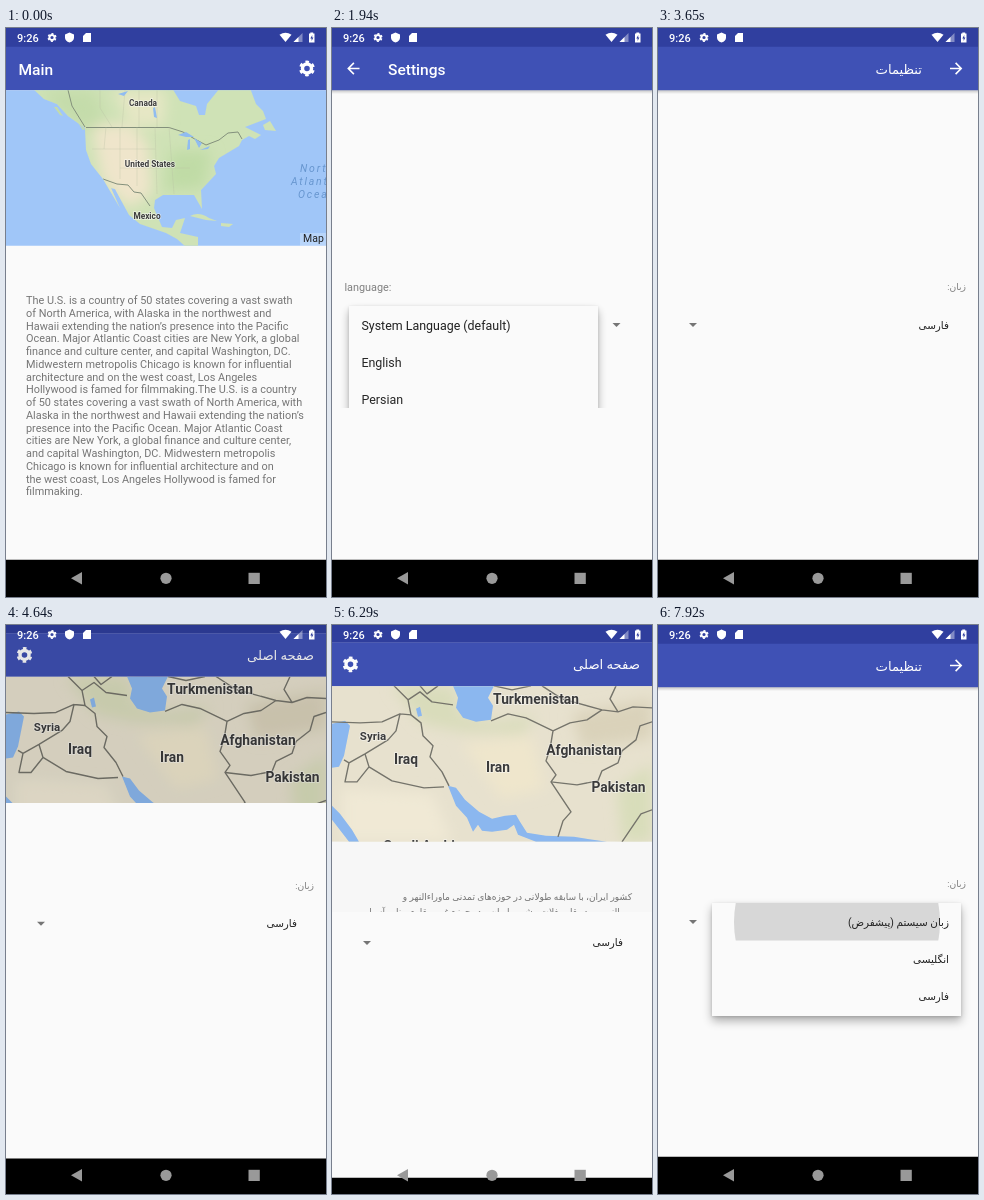
Animation, 320 px wide and 569 px high, one loop 8 s. Source, as an HTML page:

```html
<!DOCTYPE html>
<html lang="en">
<head>
<meta charset="utf-8">
<title>Language switch</title>
<style>
html, body { margin: 0; width: 100%; height: 100%; overflow: hidden; background: #000; }
body { font-family: Roboto, "DejaVu Sans", sans-serif; }
#stage { position: relative; width: 320px; height: 569px; overflow: hidden; background: #000; }
#stage svg, .screen, .popup, .copy { position: absolute; }
.screen { inset: 0; background: #fafafa; }
svg { left: 0; top: 0; display: block; }
.screen, .popup, .ripple, .swap { animation: 8s linear infinite both; }

.title { font-size: 15.56px; font-weight: 500; fill: #fff; }
.fa .title { font-size: 13.2px; font-weight: 400; }
.label { font-size: 10.89px; fill: #808080; }
.item { font-size: 12.45px; fill: #212121; }
.fa .item { font-size: 10.4px; }
.fa .label { font-size: 9.2px; }
.fa text:not(.place) { direction: rtl; }
.place { font-weight: 700; fill: #3c3c3c; text-anchor: middle; paint-order: stroke; stroke: #fff; stroke-opacity: .6; stroke-width: 1.5px; }
.sea { font-size: 10.5px; font-style: italic; letter-spacing: 1.8px; fill: #6796cf; }
.copy { margin: 0; white-space: pre; color: #757575; font-size: 10.89px; line-height: 12.76px; left: 20px; top: 267px; }
.fa .copy { direction: rtl; left: auto; right: 20px; top: 266px; font-size: 9.1px; line-height: 15.15px; }
.grain { position: absolute; inset: 218px 0 37px; opacity: .6;
  background: repeating-linear-gradient(#0000 0 2px, #00000008 2px 3px, #0000 3px 7px, #00000006 7px 8px), #f7f7f7;
  animation: grain 8s linear infinite; }

.popup { top: 278px; width: 249px; height: 112.5px; background: #fafafa; box-shadow: 0 5px 9px #0000004d, 0 1px 3px #00000026; }
.popup svg { overflow: hidden; }
.en .popup { left: 17px; animation-name: popupEn; }
.fa .popup { left: 54px; animation-name: popupFa; }
.ripple { fill: #000; fill-opacity: .14; }
.en .ripple { animation-name: rippleEn; }
.fa .ripple { animation-name: rippleFa; }
.before { animation-name: before; }
.after { animation-name: after; }

#mainEn { animation-name: mainEnShow, mainEnMove; }
#setEn { animation-name: setEnShow, setEnMove, setEnClip; }
#mainFa { animation-name: mainFaShow, mainFaMove; }
#setFa { animation-name: setFaShow, setFaMove, setFaClip; }

@keyframes grain { 0%, 1% { opacity: 0; } 8%, 100% { opacity: 1; } }

/* windows slide a little while a clip edge wipes over them */
@keyframes mainEnShow {
  0% { visibility: visible; animation-timing-function: step-end; }
  20.125%, 100% { visibility: hidden; }
}
@keyframes mainEnMove {
  0%, 14.8125% { transform: none; opacity: 1; animation-timing-function: cubic-bezier(.4,0,.2,1); }
  20.125%, 100% { transform: translateY(-2%); opacity: .9; }
}
@keyframes setEnShow {
  0% { visibility: hidden; animation-timing-function: step-end; }
  14.8125% { visibility: visible; animation-timing-function: step-end; }
  44.625%, 100% { visibility: hidden; }
}
@keyframes setEnMove {
  0%, 14.8125% { transform: translateY(4.1%); animation-timing-function: cubic-bezier(.4,0,.2,1); }
  20.125%, 100% { transform: none; }
}
@keyframes setEnClip {
  0%, 14.8125% { clip-path: inset(95.9% 0 0 0); animation-timing-function: cubic-bezier(.3,0,.8,.15); }
  15.698% { clip-path: inset(57.54% 0 0 0); animation-timing-function: cubic-bezier(.05,.7,.1,1); }
  20.125%, 100% { clip-path: inset(0 0 0 0); }
}
@keyframes mainFaShow {
  0% { visibility: hidden; animation-timing-function: step-end; }
  57.175%, 100% { visibility: visible; }
}
@keyframes mainFaMove {
  0%, 57.175% { transform: translateY(-2%); opacity: .9; animation-timing-function: cubic-bezier(.4,0,.2,1); }
  62.4875%, 77.6875% { transform: none; opacity: 1; animation-timing-function: cubic-bezier(.4,0,.2,1); }
  83%, 100% { transform: translateY(-2%); opacity: .9; }
}
@keyframes setFaShow {
  0% { visibility: hidden; animation-timing-function: step-end; }
  44.625% { visibility: visible; animation-timing-function: step-end; }
  62.4875% { visibility: hidden; animation-timing-function: step-end; }
  77.6875%, 100% { visibility: visible; }
}
@keyframes setFaMove {
  0%, 57.175% { transform: none; animation-timing-function: cubic-bezier(.4,0,.2,1); }
  62.4875%, 77.6875% { transform: translateY(4.1%); animation-timing-function: cubic-bezier(.4,0,.2,1); }
  83%, 100% { transform: none; }
}
@keyframes setFaClip {
  0%, 57.175% { clip-path: inset(0 0 0 0); animation-timing-function: cubic-bezier(.3,0,.8,.15); }
  58.06% { clip-path: inset(38.36% 0 0 0); animation-timing-function: cubic-bezier(.05,.7,.1,1); }
  62.4875%, 77.6875% { clip-path: inset(95.9% 0 0 0); animation-timing-function: cubic-bezier(.3,0,.8,.15); }
  78.5725% { clip-path: inset(57.54% 0 0 0); animation-timing-function: cubic-bezier(.05,.7,.1,1); }
  83%, 100% { clip-path: inset(0 0 0 0); }
}
@keyframes popupEn {
  0%, 22.75% { opacity: 0; clip-path: inset(0 0 75px 0); animation-timing-function: ease-out; }
  24.5% { opacity: 1; }
  26.25%, 41.625% { opacity: 1; clip-path: inset(-10px -30px -30px -30px); }
  43.5%, 100% { opacity: 0; clip-path: inset(-10px -30px -30px -30px); }
}
@keyframes popupFa {
  0%, 87.25% { opacity: 0; clip-path: inset(0 0 75px 0); animation-timing-function: ease-out; }
  89% { opacity: 1; }
  90.75%, 100% { opacity: 1; clip-path: inset(-10px -30px -30px -30px); }
}
@keyframes rippleEn {
  0% { r: 0px; animation-timing-function: step-end; }
  37.625% { r: 60px; }
  40%, 100% { r: 260px; }
}
@keyframes rippleFa {
  0% { r: 0px; animation-timing-function: step-end; }
  99%, 100% { r: 103px; }
}
@keyframes before { 0% { opacity: 1; animation-timing-function: step-end; } 41.625%, 100% { opacity: 0; } }
@keyframes after { 0% { opacity: 0; animation-timing-function: step-end; } 41.625%, 100% { opacity: 1; } }
</style>
</head>
<body>
<div id="stage">
<svg width="0" height="0">
  <defs>
    <g id="gear" fill="none" stroke="#fff">
      <circle r="5.5" stroke-width="4.2"/>
      <circle r="8.2" stroke-width="2.8" stroke-dasharray="4.294" transform="rotate(15)"/>
    </g>
    <path id="back" d="M6 0H-5M.4-5.6-5.2 0 .4 5.6" fill="none" stroke="#fff" stroke-width="1.6"/>
    <path id="caret" d="M-4-2H4L0 2Z" fill="#757575"/>
    <linearGradient id="shade" x2="0" y2="1"><stop stop-opacity=".2"/><stop offset="1" stop-opacity="0"/></linearGradient>
    <g id="bars">
      <path d="M0 0H320V19H0Z" fill="#303f9f"/>
      <path d="M0 18.7H320V62.3H0Z" fill="#3f51b5"/>
      <path d="M0 531.7H320V569H0Z"/>
    </g>
    <path id="drop" d="M0 62.3H320V66H0Z" fill="url(#shade)"/>
    <clipPath id="pane"><path d="M0 62.3H320V217.8H0Z"/></clipPath>
    <filter id="soft" x="-30%" y="-30%" width="160%" height="160%"><feGaussianBlur stdDeviation="7"/></filter>
    <path id="america" d="M26 60 38 71 51 76 62 88 79 100 80 122 85 136 97 151 114 180 105 160 109 161 123 187 134 196 160 205 171 211 180 219H192V209L174 205 179 190 170 192 166 200 156 199 148 180 149 172 157 167 188 167 196 181 195 162 210 146 208 138 213 130 233 118 236 112 243 108 249 111 255 107 239 99 260 91 257 83 250 76 244 60H214L201 76 199 87 193 87 190 78 174 73 166 60Z"/>
    <clipPath id="usLand"><use href="#america"/></clipPath>
  </defs>
</svg>

<div class="screen en" id="mainEn">
  <div class="grain"></div>
  <svg width="320" height="569">
    <use href="#bars"/>
    <g clip-path="url(#pane)">
      <path d="M0 62H320V218H0Z" fill="#a0c6f8"/>
      <use href="#america" fill="#cfe2b6"/>
      <g clip-path="url(#usLand)">
        <g filter="url(#soft)">
          <path d="M86 98 122 96 142 115 146 165 122 180 96 152Z" fill="#efe5cb"/>
          <path d="M106 62 160 62 158 98 126 98Z" fill="#e6e7c5"/>
          <path d="M35 62 88 62 100 92 80 104 50 80Z" fill="#c4dcaa"/>
          <path d="M165 123 205 123 198 160 158 162Z" fill="#c0dba6"/>
        </g>
        <path d="M80 99.5H163L177 104 187 110 200 117 213 112 222 105 232 104 236 111M97 151 111 156 122 157 128 164 135 165 144 178M62 62 66 78 79 99" fill="none" stroke="#83907c"/>
        <path d="M94 62V80L106 99M119 62 116 99M133 62V99M151 62V99M100 99 98 121M114 99V151M131 99V158M149 99 151 166M163 99 168 166M86 121H149M114 140H184" fill="none" stroke="#b6bda0" stroke-width=".5" stroke-opacity=".6"/>
        <path d="M172 107 180 104 188 109 180 109ZM182 112 184 111V121L181 122ZM188 110 196 115 193 120ZM194 122 204 118 202 121ZM147 80 149 79 151 90 148 89ZM112 66 122 63 118 68Z" fill="#90bcf0"/>
      </g>
      <path d="M184 188Q193 183 203 190L211 193 200 192ZM215 195 227 196 223 199 215 198ZM257 97 264 93 270 103 259 102Z" fill="#cfe2b6"/>
      <path d="M48 79 54 87 57 88 51 79ZM72 95 79 101 77 102Z" fill="#c4dcaa"/>
      <g style="font-size:8.3px">
        <text class="place" x="137" y="78">Canada</text>
        <text class="place" x="144" y="139">United States</text>
        <text class="place" x="141" y="191">Mexico</text>
      </g>
      <g class="sea">
        <text x="294" y="144">North</text><text x="285" y="157">Atlantic</text><text x="292" y="170">Ocean</text>
      </g>
      <path d="M294 205H320V218H294Z" fill="#fff" fill-opacity=".25"/>
      <text x="297" y="213.5" font-size="10.5" fill="#222">Map</text>
    </g>
    <text class="title" x="12.4" y="46.5">Main</text>
    <use href="#gear" transform="translate(301 40.5) scale(.82)"/>
  </svg>
  <p class="copy">The U.S. is a country of 50 states covering a vast swath
of North America, with Alaska in the northwest and
Hawaii extending the nation’s presence into the Pacific
Ocean. Major Atlantic Coast cities are New York, a global
finance and culture center, and capital Washington, DC.
Midwestern metropolis Chicago is known for influential
architecture and on the west coast, Los Angeles
Hollywood is famed for filmmaking.The U.S. is a country
of 50 states covering a vast swath of North America, with
Alaska in the northwest and Hawaii extending the nation’s
presence into the Pacific Ocean. Major Atlantic Coast
cities are New York, a global finance and culture center,
and capital Washington, DC. Midwestern metropolis
Chicago is known for influential architecture and on
the west coast, Los Angeles Hollywood is famed for
filmmaking.</p>
</div>

<div class="screen fa" id="mainFa">
  <svg width="320" height="569">
    <use href="#bars"/>
    <g clip-path="url(#pane)">
      <path d="M0 62H320V218H0Z" fill="#eae4d1"/>
      <g filter="url(#soft)">
        <path d="M60 62 122 62 128 90 160 98 205 92 190 110 130 108 90 100Z" fill="#dcdfbe"/>
        <path d="M130 120 200 112 212 165 170 175Z" fill="#f2e9cf"/>
        <path d="M240 90 320 75V115L250 125Z" fill="#ddd5bd"/>
        <path d="M285 165 320 140V218H290Z" fill="#dbe0bd"/>
        <path d="M10 165 100 170 120 218H10Z" fill="#f3ecd8"/>
      </g>
      <g fill="#8dbaf2">
        <path d="M121 62 126 74 124 84 131 94 144 98 159 96 161 82 156 74 162 62Z"/>
        <path d="M0 100 13 97 18 102 15 117 12 132 7 143 0 144Z"/>
        <path d="M116 162 124 164 133 176 147 188 160 195 173 192 184 191 188 198 195 209 214 212 242 213 275 218H204L186 211 182 201 175 206 160 208 150 207 146 201 141 208 135 194 124 182Z"/>
        <path d="M0 182 8 190 20 206 27 218H17L0 196ZM84 85 88 83 90 92 86 93Z"/>
      </g>
      <g fill="none" stroke="#77766d" stroke-width="1.4" stroke-linejoin="round">
        <path d="M0 98 28 99 50 98 68 90 64 107 56 116 33 130 17 139 12 136M33 130 37 143 60 157 92 164 112 163M17 139 13 158H25L37 143M62 62 76 76 79 91 68 90M76 76 88 68 100 78 121 81M88 62 95 70 106 62"/>
        <path d="M79 91 89 99 91 112 101 122 98 133 110 148 117 162M159 97 176 90 194 94 221 107 218 125 214 137 224 151 219 158 239 188 231 197 226 213"/>
        <path d="M221 107 238 99 255 96 270 86 286 88 301 83 320 84M219 158 245 161 266 157 270 147 286 139 290 127 304 116 308 102 320 98M162 62 180 66 199 62M210 62 230 75 270 86M284 62 278 75 286 88M290 218 309 190 320 186"/>
      </g>
      <g style="font-size:13.8px">
        <text class="place" x="204" y="80">Turkmenistan</text>
        <text class="place" x="252" y="131">Afghanistan</text>
        <text class="place" x="286.5" y="168">Pakistan</text>
        <text class="place" x="166" y="148">Iran</text>
        <text class="place" x="74" y="140">Iraq</text>
        <text class="place" x="91" y="227">Saudi Arabia</text>
        <text class="place" x="41" y="116.5" font-size="11.5">Syria</text>
      </g>
    </g>
    <text class="title" x="308" y="45.5">صفحه اصلی</text>
    <use href="#gear" transform="translate(18.5 40.5) scale(.82)"/>
  </svg>
  <p class="copy">کشور ایران، با سابقه طولانی در حوزه&zwnj;های تمدنی ماوراءالنهر و
بین&zwnj;النهرین، در قلب فلات مشهور ایران و در حوزه غربی قاره پهناور آسیا
در منطقه&zwnj;ای که اکنون به خاورمیانه شهرت دارد، واقع است. آثار باستانی
و تاریخی ایران به بیش از چهار هزار سال پیش بازمی&zwnj;گردد.ایران تا سال
1313 در مناسبات و روابط بین&zwnj;المللی با نام پرشیا در جهان شناخته
می&zwnj;شد با این حال پیش از آن نیز، بنابر اسناد تاریخی، شواهد، قراین،
فرهنگ شفاهی، کشفیات باستان&zwnj;شناسی و زبان&zwnj;شناسی می&zwnj;توان گفت 4 نام
برای کشور ایران به&zwnj;کار رفته است. قاره پهناور آسیا در منطقه&zwnj;ای که اکنون
به خاورمیانه شهرت دارد، واقع است. آثار باستانی و تاریخی ایران به
بیش از چهار هزار سال پیش بازمی&zwnj;گردد.ایران تا سال 1313 در مناسبات
و روابط بین&zwnj;المللی با نام پرشیا در جهان شناخته می&zwnj;شد با این حال پیش
از آن نیز، بنابر اسناد تاریخی، شواهد، قراین، فرهنگ شفاهی، کشفیات
باستان&zwnj;شناسی و زبان&zwnj;شناسی می&zwnj;توان گفت 4 نام برای کشور ایران به&zwnj;کار
رفته است</p>
</div>

<div class="screen en" id="setEn">
  <svg width="320" height="569">
    <use href="#bars"/><use href="#drop"/>
    <use href="#back" x="21.5" y="40.5"/>
    <text class="title" x="56" y="46.5">Settings</text>
    <text class="label" x="12.4" y="262.5">language:</text>
    <text class="item swap before" x="29" y="301.6">System Language (default)</text>
    <text class="item swap after" x="29" y="301.6">Persian</text>
    <use href="#caret" x="284.5" y="297"/>
  </svg>
  <div class="popup">
    <svg width="249" height="112.5">
      <svg y="75" width="249" height="37.5"><circle class="ripple" cx="124" cy="19"/></svg>
      <text class="item" x="12.4" y="23.6">System Language (default)</text>
      <text class="item" x="12.4" y="61">English</text>
      <text class="item" x="12.4" y="98.3">Persian</text>
    </svg>
  </div>
</div>

<div class="screen fa" id="setFa">
  <svg width="320" height="569">
    <use href="#bars"/><use href="#drop"/>
    <use href="#back" transform="translate(298 40.5) scale(-1 1)"/>
    <text class="title" x="264" y="45.5">تنظیمات</text>
    <text class="label" x="308" y="262">زبان:</text>
    <text class="item" x="291" y="300.5">فارسی</text>
    <use href="#caret" x="35" y="297"/>
  </svg>
  <div class="popup">
    <svg width="249" height="112.5">
      <svg width="249" height="37.5"><circle class="ripple" cx="125" cy="19"/></svg>
      <text class="item" x="237" y="22.5">زبان سیستم (پیشفرض)</text>
      <text class="item" x="237" y="59.8">انگلیسی</text>
      <text class="item" x="237" y="97.1">فارسی</text>
    </svg>
  </div>
</div>

<svg width="320" height="569" fill="#fff">
  <text x="11" y="13.5" font-size="11" font-weight="500">9:26</text>
  <use href="#gear" transform="translate(46 9.5) scale(.47)"/>
  <path d="M63.5 4.5 68 6.4V9.5Q68 13 63.5 14.5 59 13 59 9.5V6.4Z"/>
  <path d="M80 5H85V14H77V8Z"/>
  <path d="M273.5 6.8Q279.5 2.6 285.5 6.8L279.5 14Z"/>
  <path d="M287.5 14 296.5 5V14Z" fill-opacity=".4"/>
  <path d="M287.5 14 292.5 9V14Z"/>
  <path d="M304.3 4.5H307.2V5.5H308.5V14.5H303V5.5H304.3Z"/>
  <path d="M306.3 7 304.3 10.4H305.6V13L307.4 9.5H306.2Z" fill="#303f9f"/>
  <g fill="#999">
    <path d="M65 550.3 76 544V556.6Z"/>
    <circle cx="160" cy="550.3" r="5.6"/>
    <path d="M242.5 544.8H253.8V556H242.5Z"/>
  </g>
</svg>
</div>
</body>
</html>
```
